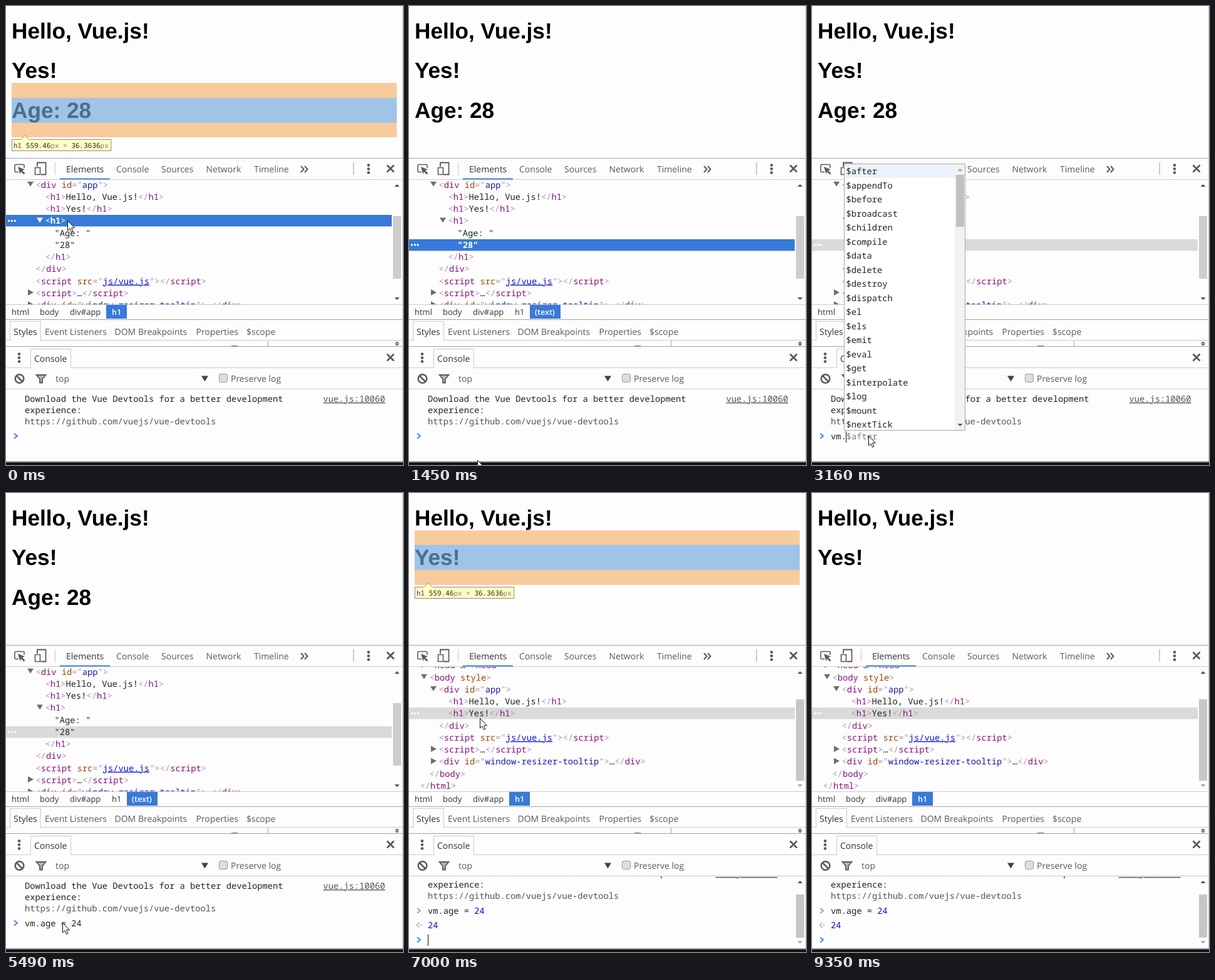
Recreate the animation shown at these times as an HTML page. Size 634x734 px, loop 9450 ms.

```html
<!DOCTYPE html>
<html lang="en">
<head>
<meta charset="utf-8">
<title>Console session</title>
<style>
html, body { margin: 0; width: 100%; height: 100%; overflow: hidden; background: #fdfdfd; }
body > svg { display: block; width: 100vw; height: 100vh; }
text { white-space: pre; text-rendering: geometricPrecision; }
.h { font: bold 35.2px "Liberation Sans", Arial, sans-serif; }
.ui { font: 14px "Open Sans", "Noto Sans", sans-serif; fill: #5a5a5a; }
.crumb { font: 13px "Open Sans", "Noto Sans", sans-serif; fill: #333; }
.crumb.on { font-weight: 600; font-size: 12.6px; fill: #fff; }
.dark { fill: #333; }
.m { font: 13.75px "Noto Sans Mono", "DejaVu Sans Mono", monospace; fill: #222; }
.tip { font-size: 11px; }
.p { fill: #a894a6; }
.n { fill: #881280; }
.a { fill: #994500; }
.v { fill: #1a1aa6; }
.l { fill: #1010d8; text-decoration: underline; }
.g { fill: #808080; }
.u { fill: #545454; }
.u.s { text-decoration: underline; }
.num { fill: #1c00cf; }
.b { font-weight: bold; }
.sel, .sel tspan { fill: #fff; font-weight: bold; }
.sel .p { fill: #ccdcf5; }
</style>
</head>
<body>
<svg id="stage" viewBox="0 0 634 734" xmlns="http://www.w3.org/2000/svg"><g id="base"></g><g id="live"></g></svg>
<script>
const LOOP = 9450, CH = 8.25, ROW = 19.25;
const BLUE = '#3879d9', GRAY = '#dadada', INK = '#5a5a5a';

// Value of the last step that has begun
const at = (t, steps) => steps.filter(s => s[0] <= t).pop().slice(1);
const one = (t, steps) => at(t, steps)[0];

const rect = (x, y, w, h, fill, more = '') => `<rect x="${x}" y="${y}" width="${w}" height="${h}" fill="${fill}" ${more}/>`;
const path = (d, fill, more = '') => `<path d="${d}" fill="${fill}" ${more}/>`;
const line = (d, color, w = 1) => path(d, 'none', `stroke="${color}" stroke-width="${w}"`);
const text = (x, y, s, cls) => `<text x="${x}" y="${y}" class="${cls}">${s}</text>`;
const clip = (x, y, w, h, body) => `<svg x="${x}" y="${y}" width="${w}" height="${h}" viewBox="${x} ${y} ${w} ${h}">${body}</svg>`;
const span = (s, cls) => `<tspan class="${cls}">${s}</tspan>`;
const tri = (x, y, dir, color, w = 4, h = 4) =>
  path(`M${x - w} ${y - dir * h / 2}h${2 * w}l${-w} ${dir * h}z`, color);

// Markup pieces of the element tree
const open = (name, attrs = '') => span('&lt;', 'p') + span(name, 'n') + attrs + span('&gt;', 'p');
const close = name => span('&lt;/', 'p') + span(name, 'n') + span('&gt;', 'p');
const attr = (key, value, cls = 'v') => ' ' + span(key, 'a') + span('="', 'p') + span(value, cls) + span('"', 'p');
const wrap = (name, inner, attrs) => open(name, attrs) + inner + close(name);

// Rows: [level, arrow (1 open, 2 closed), markup]
const divOpen = [2, 1, open('div', attr('id', 'app'))];
const hello = [3, 0, wrap('h1', 'Hello, Vue.js!')];
const yes = [3, 0, wrap('h1', 'Yes!')];
const tail = [
  [2, 0, close('div')],
  [2, 0, wrap('script', '', attr('src', 'js/vue.js', 'l'))],
  [2, 2, wrap('script', '…')],
  [2, 2, wrap('div', '…', attr('id', 'window-resizer-tooltip'))],
  [1, 0, close('body')],
  [0, 0, close('html')]
];
const treeBefore = [divOpen, hello, yes, [3, 1, open('h1')], [4, 0, '"Age: "'], [4, 0, '"28"'], [3, 0, close('h1')], ...tail];
const treeAfter = [[1, 2, wrap('head', '…')], [1, 1, open('body', ' ' + span('style', 'a'))], divOpen, hello, yes, ...tail];

const ENTER = 5770;
const cursorSteps = [
  [0, 98, 343], [370, 96, 349], [520, 96, 356], [640, 96, 361], [790, 96, 362], [940, 96, 375],
  [1210, 97, 440], [1330, 102, 590], [1450, 109, 726], [1600, 112, 712], [1720, 107, 697], [1840, 105, 691],
  [2240, 97, 689], [2360, 90, 687], [6850, 109, 372], [7000, 113, 360], [7120, 114, 358], [7240, 114, 357],
  [7510, 118, 357], [7630, 128, 357], [7750, 145, 360], [7870, 165, 371], [7990, 187, 384],
  [8110, 212, 425], [8230, 255, 540], [8350, 300, 699], [9350, -50, 0]
];
const selectSteps = [[0, 3], [640, 4], [1090, 5], [ENTER, 4]];
const focusSteps = [[0, BLUE], [1840, GRAY], [7240, BLUE], [9350, GRAY]];
const hoverSteps = [[0, -1], [520, 4], [640, -1], [940, 5], [1090, -1], [6850, 5], [7000, -1], [7870, 5], [7990, 6], [8110, 8], [8230, -1]];
const boxSteps = [[0, 'age'], [520, ''], [6850, 'app'], [7000, 'yes'], [7870, 'app'], [7990, '']];
const caretSteps = [[0, 0], [1840, 1], [2360, 0], [2760, 1], [5490, 0], [ENTER, 1], [6310, 0], [6850, 1], [7240, 0]];
const keyTimes = [2760, 2880, 3160, 3410, 3560, 3710, 3830, 4260, 4660, 4810, 4930];
const command = 'vm.age = 24';
const hintSteps = [[0, ''], [2760, 'm'], [2880, ''], [3160, '$after'], [3410, 'ge'], [3560, 'e'], [3710, '']];
const popupSteps = [[0, ''], [2760, 'v'], [3160, '$'], [3410, 'a'], [3710, '']];
const flashTimes = [ENTER, 5890, 6040, 6190, 6310, 6580, 6850];

const words = s => s.split(' ');
const lists = {
  v: { x: 26, y: 340, w: 195, items: words('vm valueOf values var void VTTCue ValidityState Vue VideoTrack VideoTrackList VisualViewport VRDisplay VREyeParameters VRFrameData VideoPlaybackQuality') },
  $: { x: 51, y: 252, w: 194, scroll: true, items: words('$after $appendTo $before $broadcast $children $compile $data $delete $destroy $dispatch $el $els $emit $eval $get $interpolate $log $mount $nextTick') },
  a: { x: 51, y: 632, w: 96, items: words('age ageLimit') }
};

function dots(x, y) {
  return [-6, 0, 6].map(d => `<circle cx="${x}" cy="${y + d}" r="2.3" fill="${INK}"/>`).join('');
}
const cross = (x, y) => line(`M${x - 5.5} ${y - 5.5}l11 11m0 -11l-11 11`, INK, 2.8);

function drawBase() {
  const rule = (y, c = '#ccc') => rect(0, y, 634, 1, c);
  const tabs = [[96, 'Elements', 'dark'], [176, 'Console'], [248, 'Sources'], [319.5, 'Network'], [396, 'Timeline']];
  const side = [[12, 'Styles', 'dark'], [62, 'Event Listeners'], [173.5, 'DOM Breakpoints'], [303.5, 'Properties'], [384, '$scope']];
  const put = y => ([x, s, c = '']) => text(x, y, s, 'ui ' + c);
  return rect(0, 0, 634, 734, '#fdfdfd')
    + rule(243, '#a3a3a3') + rule(277) + rule(477) + rule(501, '#a3a3a3') + rule(544, '#a3a3a3') + rule(578) + rule(612)
    // Main toolbar
    + line('M20 265.5h-4.5q-1.5 0 -1.5 -1.5v-9q0 -1.500 1.500 -1.500h12q1.500 0 1.500 1.500v4', INK, 1.6)
    + path('M19 257l11 4.500l-4 1.500l4.500 4.500l-2 2l-4.500 -4.500l-1.500 4z', INK)
    + line('M50 257v-6.500h13.500v19h-8', INK, 1.8) + line('M46.500 258.500h8v11h-8z', INK, 1.600)
    + rect(78, 250, 1, 20, '#ccc') + rect(554, 250, 2, 20, '#ccc')
    + tabs.map(put(266)).join('') + rect(86, 275.5, 80, 2, '#3f82e8')
    + line('M471 256l4.500 5l-4.500 5m6 -10l4.500 5l-4.500 5', INK, 2)
    + dots(579, 260.5) + cross(614, 260)
    // Style tabs
    + rule(534) + rect(6.5, 504.5, 49, 31, '#fdfdfd', 'stroke="#ccc"') + rect(7, 534, 48, 3, '#fdfdfd')
    + side.map(put(526)).join('')
    + rect(360, 543, 10, 1, '#777') + rect(418, 535, 1, 9, '#aaa')
    + tri(624.5, 538, -1, '#555', 3.5, 3) + tri(624.5, 542, 1, '#555', 3.5, 3)
    // Console drawer
    + dots(21, 562.5) + rect(39.5, 548.5, 64, 30, '#fdfdfd', 'stroke="#ccc"') + rect(40, 577, 63, 2, '#fdfdfd')
    + text(45, 569, 'Console', 'ui dark') + cross(614, 562)
    + `<circle cx="21.500" cy="596" r="6.800" fill="none" stroke="${INK}" stroke-width="2.500"/>` + line('M17 591.500l9 9', INK, 2.5)
    + path('M48.500 590h15l-5.500 6.500v6h-4v-6z', '#b5b5b5', `stroke="${INK}" stroke-width="1.800"`)
    + text(79, 601, 'top', 'ui') + tri(317.5, 596, 1, '#444', 5.5, 9)
    + rect(340.5, 588.5, 13, 13, '#dedede', 'rx="2.500" stroke="#9a9a9a"') + text(359, 601, 'Preserve log', 'ui');
}

function drawPage(t) {
  const box = one(t, boxSteps);
  let s = text(9, 52, 'Hello, Vue.js!', 'h') + text(9, 115, 'Yes!', 'h');
  if (t < ENTER) s += text(9, 179, 'Age: 28', 'h');
  if (!box) return s;
  const top = { age: 147, yes: 83, app: 20 }[box];
  const isApp = box === 'app';
  const h = isApp ? 103 : 40, pad = isApp ? 0 : 24, end = top + h + (isApp ? 0 : box === 'age' ? 23 : 24);
  const orange = 'rgba(246,178,107,.66)';
  s += rect(9, top, 615, h, 'rgba(111,168,220,.66)');
  if (pad) s += rect(9, top - pad + (box === 'yes' ? 1 : 0), 615, pad - (box === 'yes' ? 1 : 0), orange) + rect(9, top + h, 615, end - top - h, orange);
  const name = isApp ? 'div#app' : 'h1', tall = isApp ? '93.6364' : '36.3636';
  const chars = name.length + tall.length + 14;
  const y = end + 3.5;
  return s + path(`M9.5 ${y}H23.500L30.500 ${y - 6.5}L37.500 ${y}H${16 + chars * 6.6}v18H9.500z`, '#ffffc2', 'stroke="#8a8a8a"')
    + text(12, y + 13.5, span(name, 'n') + ' 559.46' + span('px × ', 'g') + tall + span('px', 'g'), 'm tip');
}

// Ease-out along a curve with handles (0,0) and (.2,1)
function easeOut(x) {
  let lo = 0, hi = 1;
  for (let i = 0; i < 20; i++) {
    const s = (lo + hi) / 2;
    if (.6 * s * s * (1 - s) + s ** 3 < x) lo = s; else hi = s;
  }
  return 3 * lo * lo * (1 - lo) + lo ** 3;
}
const mix = (a, b, k) => `rgb(${a.map((v, i) => Math.round(v + (b[i] - v) * k))})`;

function drawTree(t) {
  const after = t >= ENTER, rows = after ? treeAfter : treeBefore;
  const start = after ? 266 : 276.3;
  const picked = one(t, selectSteps), hover = one(t, hoverSteps), focus = one(t, focusSteps);
  let s = '';
  rows.forEach(([level, arrow, markup], i) => {
    const top = start + i * ROW, mid = top + 9.5, x = 17.5 + 15 * level;
    const lit = i === picked && focus === BLUE;
    if (i === picked) {
      s += rect(0, Math.round(top), 616, 18.5, focus);
      s += [4.5, 9.3, 14.1].map(cx => `<circle cx="${cx}" cy="${mid}" r="1.700" fill="#fff"/>`).join('');
    } else if (i === hover) s += rect(3, top, 609.5, 18.5, '#ebf2fc', 'rx="5"');
    let body = markup;
    if (after && i === 2 && t < 7000) {
      const k = easeOut((flashTimes.filter(f => f <= t).pop() - ENTER) / 1120);
      s += rect(x + CH, top, 3 * CH, 18, mix([158, 54, 153], [253, 245, 253], k));
      body = markup.replace('class="n"', `style="fill:${mix([255, 255, 255], [136, 18, 128], k)}"`);
    }
    const color = lit ? '#fff' : '#6e6e6e';
    if (arrow === 1) s += tri(x - 8.5, mid - 1, 1, color, 5, 8);
    if (arrow === 2) s += path(`M${x - 12.5} ${mid - 6}l9 5l-9 5z`, color);
    s += text(x, top + 14.4, body, 'm' + (lit ? ' sel' : ''));
  });
  const bar = after ? rect(618, 330, 13, 130, '#c6c6c6') : rect(618, 336, 13, 100, '#cdcdcd');
  return clip(0, 278, 634, 199, s + bar + tri(624.5, 287, -1, '#505050') + tri(624.5, 468, 1, after ? '#a3a3a3' : '#505050'));
}

function drawCrumbs(t) {
  const onText = t >= 640 && t < ENTER;
  return text(9, 494, 'html', 'crumb') + text(54, 494, 'body', 'crumb') + text(102, 494, 'div#app', 'crumb')
    + (onText
      ? text(169, 494, 'h1', 'crumb') + rect(193, 478, 49, 22, BLUE) + text(201, 494, '(text)', 'crumb on')
      : rect(160, 478, 33, 22, BLUE) + text(169, 494, 'h1', 'crumb on'));
}

function drawConsole(t) {
  const after = t >= ENTER, dy = after ? -20 : 0;
  const chevron = (y, color) => line(`M13 ${y - 4}l5 4l-5 4`, color, 2);
  const caret = x => one(t, caretSteps) ? rect(x, after ? 706 : 680, 1, 18, '#111') : '';
  let s = text(30, 633 + dy, 'Download the Vue Devtools for a better development', 'm')
    + text(30, 651 + dy, 'experience:', 'm') + text(30, 669 + dy, 'https://github.com/vuejs/vue-devtools', 'm u')
    + text(after ? 489.5 : 506.5, 633 + dy, 'vue.js:10060', 'm u s');
  if (after) {
    s += chevron(668, '#a5a5a5') + text(30, 673, 'vm.age = ' + span('24', 'num'), 'm')
      + line('M16.500 687l-4 4l4 4', '#b0b0b0', 1.6) + rect(18, 690, 2, 2, '#b0b0b0')
      + text(30, 696, '24', 'm num') + chevron(714.5, '#4285f4') + caret(30)
      + rect(618, 642, 13, 69, '#c6c6c6') + tri(624.5, 622, -1, '#505050') + tri(624.5, 718.5, 1, '#a3a3a3');
  } else {
    const typed = command.slice(0, keyTimes.filter(k => k <= t).length);
    s += chevron(687.5, '#4285f4') + text(30, 693, typed + span(one(t, hintSteps), 'g'), 'm')
      + caret(Math.floor(30 + typed.length * CH));
  }
  return clip(0, 613, 634, 115, s);
}

function drawPopup(t) {
  const key = one(t, popupSteps);
  if (!key) return '';
  const { x, y, w, items, scroll } = lists[key], h = items.length * 22.5 - .5;
  const bold = key === '$' ? 0 : key === 'a' ? (t >= 3560 ? 2 : 1) : (t >= 2880 ? 1 : 1);
  let s = rect(x, y, w, h, '#fff') + rect(x + 1, y + 1, w - 2, 22, '#ebf2fc');
  items.forEach((item, i) => {
    s += text(x + 3.5, y + 17 + 22.5 * i, span(item.slice(0, bold), 'b') + item.slice(bold), 'm');
  });
  if (scroll) s += rect(x + 177, y + 1, 16, h - 2, '#f2f2f2') + rect(x + 179, y + 18, 13, 83, '#c1c1c1')
    + tri(x + 185.5, y + 10, -1, '#a3a3a3') + tri(x + 185.5, y + h - 9, 1, '#505050');
  return clip(x, y, w, h, s + rect(x + .5, y + .5, w - 1, h - 1, 'none', 'stroke="#a8a8a8"'));
}

function drawFrame(t) {
  const [x, y] = at(t, cursorSteps);
  return drawPage(t) + drawTree(t) + drawCrumbs(t) + drawConsole(t)
    + rect(633, 0, 1, 729, '#c8c8c8') + rect(0, 728, 634, 2, '#8c8c8c') + rect(0, 730, 634, 4, '#1b0f12')
    + drawPopup(t)
    + path('M.5 .500V16L4 12.700L6.500 18.500L9 17.500L6.600 11.800H11.500Z', '#fff', `stroke="#111" transform="translate(${x} ${y})"`);
}

document.getElementById('base').innerHTML = drawBase();
const live = document.getElementById('live');
const origin = performance.now();
let shown = '';
function tick() {
  const next = drawFrame((performance.now() - origin) % LOOP);
  if (next !== shown) live.innerHTML = shown = next;
  requestAnimationFrame(tick);
}
tick();
</script>
</body>
</html>
```
